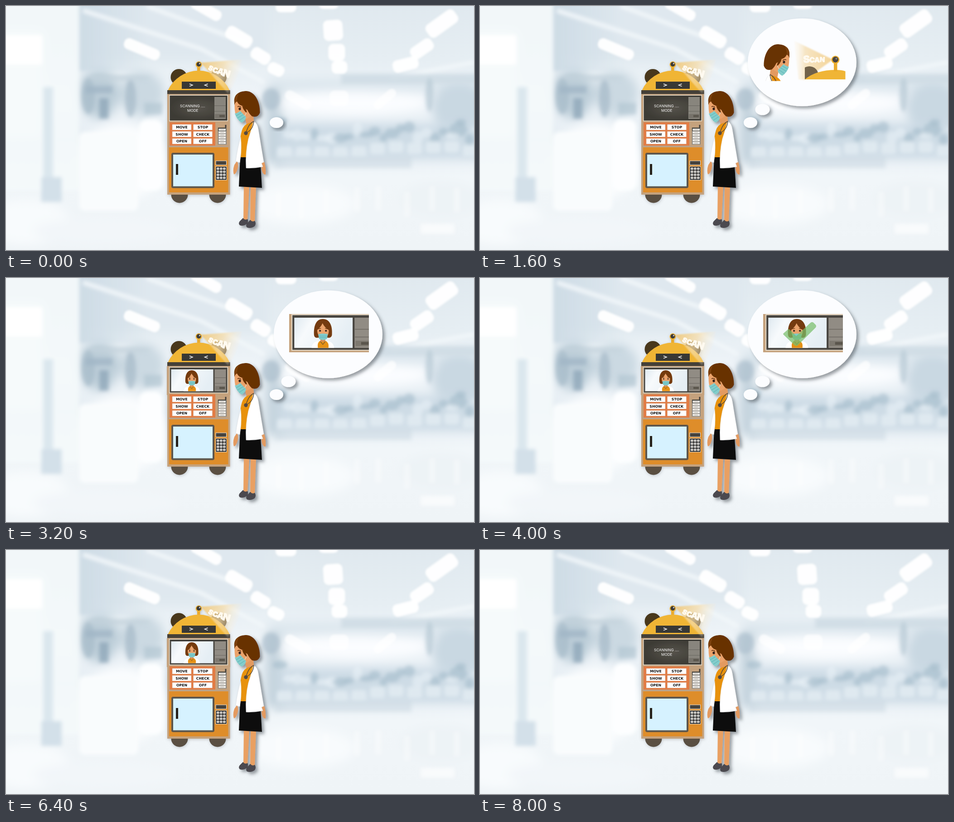
Recreate the animation shown at these times as an HTML page. Size 1033 px wide and 542 px high, loop 8800 ms.

```html
<!DOCTYPE html>
<html lang="en">
<head>
<meta charset="utf-8">
<title>Scanning robot</title>
<style>
html, body { margin: 0; width: 100%; height: 100%; overflow: hidden; background: #eef4f8; }
svg { display: block; width: 100vw; height: 100vh; }
.hide { display: none; }
.btn { font: 800 7.8px "DejaVu Sans", sans-serif; text-anchor: middle; fill: #111; }
.mode { font: 400 8.2px Inter, sans-serif; fill: #fff; }
.scan { font-weight: 900; font-family: Inter, "Open Sans", sans-serif; text-anchor: middle; fill: #fffaf0; stroke: #fffaf0; stroke-width: .8; stroke-linejoin: round; }
</style>
</head>
<body>
<svg viewBox="0 0 1033 542" preserveAspectRatio="none">
<defs>
  <filter id="soft" x="-20%" y="-20%" width="140%" height="140%"><feGaussianBlur stdDeviation="11"/></filter>
  <filter id="mid" x="-20%" y="-20%" width="140%" height="140%"><feGaussianBlur stdDeviation="4.5"/></filter>
  <filter id="lite" x="-20%" y="-20%" width="140%" height="140%"><feGaussianBlur stdDeviation="2.2"/></filter>
  <filter id="haze" x="-20%" y="-20%" width="140%" height="140%"><feGaussianBlur stdDeviation="1.6"/></filter>
  <filter id="drop" x="-20%" y="-20%" width="150%" height="150%"><feDropShadow dx="5" dy="5" stdDeviation="3.5" flood-color="#4a4f55" flood-opacity=".55"/></filter>
  <filter id="dim" x="-20%" y="-20%" width="150%" height="150%"><feDropShadow dx="1" dy="2" stdDeviation="3" flood-color="#5a6068" flood-opacity=".3"/></filter>
  <linearGradient id="room" x2="0" y2="1">
    <stop offset="0" stop-color="#e0e9ef"/><stop offset=".22" stop-color="#e6eef3"/>
    <stop offset=".38" stop-color="#f0f5f9"/><stop offset=".55" stop-color="#e5edf3"/>
    <stop offset=".7" stop-color="#f1f6f9"/><stop offset="1" stop-color="#eff4f7"/>
  </linearGradient>
  <linearGradient id="side" x2="1" y2="0">
    <stop offset="0" stop-color="#cddbe5"/><stop offset="1" stop-color="#cddbe5" stop-opacity="0"/>
  </linearGradient>
  <linearGradient id="ray" gradientUnits="userSpaceOnUse" x1="430" y1="128" x2="512" y2="158">
    <stop offset="0" stop-color="#f0c46e" stop-opacity=".85"/><stop offset=".55" stop-color="#f5dcaa" stop-opacity=".75"/>
    <stop offset="1" stop-color="#faf0dc" stop-opacity=".1"/>
  </linearGradient>
  <linearGradient id="ray2" gradientUnits="userSpaceOnUse" x1="780" y1="119" x2="692" y2="119">
    <stop offset="0" stop-color="#f3d190" stop-opacity=".95"/><stop offset=".7" stop-color="#f5e0b8" stop-opacity=".85"/>
    <stop offset="1" stop-color="#fbf3e3" stop-opacity=".15"/>
  </linearGradient>
  <linearGradient id="glass" x2="1" y2=".3">
    <stop offset="0" stop-color="#dfe9f0"/><stop offset=".3" stop-color="#f7fafc"/><stop offset="1" stop-color="#e5eef4"/>
  </linearGradient>
  <radialGradient id="dark"><stop offset="0" stop-color="#56534b"/><stop offset="1" stop-color="#3d3b35"/></radialGradient>
  <clipPath id="headBox"><rect x="630" y="80" width="60" height="86.5"/><rect x="622" y="80" width="10" height="66"/></clipPath>
  <clipPath id="shotBox"><rect x="625" y="80" width="176" height="85"/></clipPath>
  <clipPath id="earBox"><rect x="717" y="130" width="90" height="33"/></clipPath>

  <g id="shot">
    <rect x="355" y="196" width="140" height="64" fill="#c5a27d"/>
    <rect x="360" y="197.500" width="130" height="58.500" fill="#e9decb"/>
    <rect x="361.500" y="199" width="127" height="55.500" fill="#47443f"/>
    <rect x="364.500" y="203" width="93" height="48.500" fill="url(#glass)"/>
    <path d="M396 231C395 213 401 205 410 205S426 213 424.500 231Q423 236 418 235H402Q397 236 396 231Z" fill="#743b10"/>
    <path d="M406 234h8v8h-8z" fill="#d98f59"/>
    <path d="M401 223Q407 218 409.500 212Q413 219 419.500 223Q420 233 410.500 238Q401 233 401 223Z" fill="#eaa36c"/>
    <path d="M392 251.500Q393 242 403 240.500L410 246L417 240.500Q427 242 428 251.500Z" fill="#fff"/>
    <path d="M402 251.500Q401 243 405 240.500Q410 243 415 240.500Q420 243 419 251.500Z" fill="#e59116"/>
    <path d="M406 241L410 246L414 241" fill="none" stroke="#665035" stroke-width=".8"/>
    <path d="M402.500 229.500Q410 227.500 418 229.500L416.500 237Q410 240.500 404 237Z" fill="#7fcbcc"/>
    <path d="M404 232.500h13M404.500 235h12" stroke="#5aabb1" stroke-width=".6"/>
    <circle cx="405.500" cy="224" r="1.500" fill="#38251c"/><circle cx="415" cy="224" r="1.500" fill="#38251c"/>
    <path d="M403 221l4-1M413.500 220l4 1" stroke="#693510"/>
    <rect x="460.500" y="203" width="25" height="48.500" fill="#918c84"/>
    <path d="M461 221.500h24M461 234h24" stroke="#67635c" stroke-width=".9"/>
    <rect x="462" y="240" width="22" height="8.500" fill="#7d786f"/><rect x="471" y="242" width="12" height="4.500" fill="#5a554c"/>
  </g>

  <g id="woman">
    <path d="M525 400H537L533 477H524Z M540 400H552L549 480H539Z" fill="#e9a062"/>
    <path d="M523 471Q528 477 533 473Q536 479 532 484Q523 490 516 487Q512 483 516 478Z M539 475Q544 481 549 477Q553 483 549 489Q541 495 532 492Q528 488 532 483Z" fill="#4b4a50"/>
    <path d="M510 344Q514 352 511 362Q508 373 503 374Q500 365 504 353Z M563 350L570 346Q574 358 573 374Q568 376 565 366Z" fill="#e39a60"/>
    <path d="M517 333L561 338L565 404L514 401Z" fill="#111"/>
    <path d="M528 249L545 238L548 262L533 275Z" fill="#e39a60"/>
    <path d="M530 263Q540 258 548 257L545 302L533 336H518Q515 300 519 283Q522 268 530 263Z" fill="#e8920f"/>
    <path d="M518 291Q511 315 507 345L516 348Q520 325 519 304Z M546 256Q555 260 557 274Q563 312 569 347L564 349L567 357Q548 361 530 360Q528 325 535 295Q542 274 546 256Z" fill="#fff" stroke="#dbdcdd" stroke-width=".6"/>
    <path d="M547 256Q535 262 530 281M547 257Q545 275 531 281" fill="none" stroke="#5b4a39" stroke-width="1.500"/>
    <circle cx="529.500" cy="282.500" r="4.200" fill="#534a43"/>
    <path d="M506 207Q503 222 506 238L516 250Q530 255 541 244L542 212Z" fill="#eba26a"/>
    <path d="M504 214C502 197 514 189 531 189C549 190 561 212 560.500 237Q556 249 543 245Q537 240 533 231Q527 228 523 222Q513 220 510 212Q506 213 504 220Z" fill="#683303"/>
    <path d="M504 212Q505 198 514 193Q510 203 509 213Q506 213 504 218Z" fill="#7b400c"/>
    <path d="M521 221Q531 226 532 238Q524 233 521 221Z" fill="#683303"/>
    <path d="M511 224Q515 221 519 225" fill="none" stroke="#55290c" stroke-width="1.500"/>
    <ellipse cx="516" cy="228.500" rx="2.600" ry="3" fill="#35241e"/>
    <path d="M531 236L526 246" stroke="#e4f1ef"/>
    <path d="M505 239Q511 238 517 233L530 247Q528 255 520 259Q510 253 505 239Z" fill="#83cdcb"/>
    <path d="M508 244L520 237M511 249L524 241M515 254L527 246" stroke="#57aeb2" stroke-width="1"/>
  </g>
</defs>

<rect width="1033" height="542" fill="url(#room)"/>
<g id="far" filter="url(#soft)"></g>
<g id="near" filter="url(#mid)"></g>
<g id="lamps" filter="url(#lite)"></g>

<g id="robot" filter="url(#dim)">
  <circle cx="381.500" cy="158" r="18" fill="#49381f"/>
  <circle cx="469" cy="158" r="18" fill="#49381f"/>
  <circle cx="383" cy="419" r="18.500" fill="#5a5043"/><circle cx="467" cy="419" r="18.500" fill="#5a5043"/>
  <rect x="422" y="133" width="6.500" height="18" fill="#e9ab2d"/>
  <path d="M357 188A75 75 0 0 1 494 188Z" fill="#f0b536"/>
  <circle cx="425.500" cy="130" r="7" fill="#eeb02e"/><circle cx="425.500" cy="129.500" r="5" fill="#3c3a38"/><circle cx="427.500" cy="127.800" r="1.600" fill="#d6d2cc"/>
  <rect x="356" y="187" width="138.500" height="232" fill="#c5a27d"/>
  <rect x="356" y="187" width="138.500" height="8.500" fill="#454039"/>
  <rect x="388" y="168" width="75" height="16" fill="#393836"/>
  <g fill="none" stroke="#fff" stroke-width="1.400"><path d="M405 173l7 2.700l-7 2.700M445.500 173l-7 2.700l7 2.700"/></g>
  <g id="wait">
    <rect x="360" y="197.500" width="130" height="58.500" fill="#e9decb"/>
    <rect x="361.500" y="199" width="127" height="55.500" fill="url(#dark)"/>
    <rect x="460" y="202" width="25" height="49" fill="#88857d"/>
    <path d="M460 221.500h25M460 234h25" stroke="#69665f"/>
    <rect x="461" y="240" width="23" height="9" fill="#76726a"/><rect x="471" y="242" width="12" height="5" fill="#5c5850"/>
    <text class="mode" x="384" y="224.500">SCANNING ....</text>
    <text class="mode" x="400" y="235">MODE</text>
  </g>
  <use id="live" href="#shot"/>
  <rect x="361" y="258.500" width="101" height="51.500" fill="#e27b44"/>
  <g id="keys"></g>
  <path d="M483.500 264h3v8h-3z" fill="#45403a"/>
  <rect x="467.500" y="270" width="19.500" height="38" fill="#8e8a83"/>
  <rect x="468" y="270" width="18" height="8" fill="#4c4842"/>
  <g id="slots"></g>
  <path d="M358 311.500h134" stroke="#b7a28b" stroke-width="2"/>
  <rect x="360" y="314" width="130.500" height="100" fill="#de8d2a"/>
  <rect x="367" y="328" width="91" height="74.500" rx="2" fill="#d6f2ff" stroke="#5b564d" stroke-width="4"/>
  <rect x="375" y="351" width="5" height="24" fill="#28231e"/>
  <rect x="463" y="344" width="23.500" height="9" fill="#45423e" stroke="#e9e4da"/>
  <rect x="463" y="356.500" width="24" height="30" fill="#161616" stroke="#e9e4da"/>
  <g id="pad"></g>
</g>

<path d="M430 126L520 119Q515 160 490 194Z" fill="url(#ray)" filter="url(#haze)"/>
<g id="word"></g>

<use href="#woman" filter="url(#drop)"/>

<g fill="#fcfdff" filter="url(#drop)">
  <ellipse id="dot1" cx="597" cy="259" rx="15" ry="12"/>
  <ellipse id="dot2" cx="623.500" cy="230" rx="16" ry="12.300"/>
  <ellipse id="cloud" cx="711" cy="125" rx="120" ry="97.500"/>
</g>
<g id="scanView">
  <g clip-path="url(#headBox)"><use href="#woman" transform="matrix(-1 0 0 1 1187 -104)"/></g>
  <path d="M779 119L693 77L703 163L717 164Z" fill="url(#ray2)" filter="url(#haze)"/>
  <g clip-path="url(#earBox)">
    <circle cx="727" cy="154" r="20" fill="#5a4c36" opacity=".85"/>
    <path d="M717 163Q742 142 785 142Q800 142 806.500 145V163Z" fill="#f0b536"/>
  </g>
  <rect x="781" y="124" width="7.500" height="21" fill="#e9ab2d"/>
  <circle cx="784.500" cy="119.500" r="9" fill="#eeb02e"/><circle cx="784.500" cy="119" r="6.500" fill="#494540"/><circle cx="786.500" cy="117" r="2" fill="#8b8984"/>
</g>
<g id="shotView" clip-path="url(#shotBox)"><use href="#shot" transform="translate(131.500 -193) scale(1.385)"/></g>
<g id="tick" fill="#79bf6b" opacity=".72">
  <path d="M671 122L680 114Q682 113 684 115L698 129L730 99Q733 97 736 99L741 104Q743 107 741 110L702 149Q698 153 694 149L670 126Q668 124 671 122Z"/>
</g>
</svg>

<script>
const $ = id => document.getElementById(id);
const rect = (x, y, w, h, fill, extra = '') =>
  `<rect x="${x}" y="${y}" width="${w}" height="${h}" fill="${fill}" ${extra}/>`;
const blob = (x, y, rx, ry, fill, o = 1) =>
  `<ellipse cx="${x}" cy="${y}" rx="${rx}" ry="${ry}" fill="${fill}" opacity="${o}"/>`;
let seed = 7;
const rnd = () => (seed = seed * 16807 % 2147483647) / 2147483647;
const times = (n, fn) => Array.from({ length: n }, (_, i) => fn(i)).join('');

// Blurred hall
$('far').innerHTML =
  rect(160, -30, 420, 150, '#dfe8ef') +
  rect(-40, 55, 120, 240, '#fcfeff') +
  blob(205, 195, 45, 55, '#bccdd8') + blob(300, 195, 50, 50, '#cbd9e2') +
  rect(580, 160, 480, 30, '#dde7ee') + rect(575, 185, 32, 165, '#c2d2dc') +
  blob(765, 215, 165, 26, '#fbfdff') + blob(1000, 225, 60, 55, '#c9d8e2') +
  rect(600, 262, 450, 78, '#cedce6') +
  blob(255, 345, 95, 85, '#fbfdfe') + blob(45, 480, 95, 50, '#f8fbfd') +
  blob(650, 440, 120, 45, '#f8fbfd') + blob(220, 500, 160, 30, '#f2f6f9') + blob(960, 430, 90, 40, '#edf3f6');

$('near').innerHTML =
  rect(162, -20, 150, 165, 'url(#side)') +
  rect(-20, -20, 181, 430, '#f5f9fb', 'opacity=".85"') +
  rect(-20, 65, 100, 65, '#fff') + rect(82, 180, 22, 250, '#dbe7ee') + rect(78, 380, 45, 55, '#d3e0e9') +
  blob(182, 200, 14, 40, '#a9bdcb', .8) + rect(175, 178, 60, 16, '#9fb5c4', 'opacity=".75"') +
  rect(206, 205, 20, 45, '#8fa8b9', 'opacity=".8"') + blob(275, 205, 12, 42, '#a6bac8', .7) +
  blob(250, 160, 70, 7, '#c3d2dc', .7) + rect(305, 215, 40, 26, '#b3c6d2', 'opacity=".7"') +
  rect(294, 252, 52, 158, '#fdfeff', 'rx="18"') + rect(162, 280, 130, 175, '#f9fcfd', 'rx="12"') +
  '<path d="M170 10L430 95L570 170M310 0L540 85M1033 125L850 160" fill="none" stroke="#f1f6f9" stroke-width="9"/>' +
  rect(740, 151, 310, 22, '#cddbe4', 'opacity=".8"') +
  blob(585, 207, 20, 24, '#a9becb', .65) + blob(935, 197, 9, 38, '#b7c9d5', .7) + blob(998, 275, 20, 16, '#a9bfcd', .7) +
  times(24, i => blob(605 + i * 19, 255 + rnd() * 42, 8 + rnd() * 9, 6 + rnd() * 10, rnd() < .5 ? '#a3bbca' : '#eaf1f6', .6)) +
  times(11, i => rect(598 + i * 41, 300 + rnd() * 14, 34, 26, '#dfe9f0', 'rx="6"')) +
  rect(595, 334, 300, 26, '#c9d8e2', 'opacity=".5"') +
  times(9, i => rect(530 + i * 55 + rnd() * 20, 400 + rnd() * 20, 14, 55, '#fff', 'opacity=".35"')) +
  rect(915, 484, 75, 22, '#fff', 'opacity=".6"');

const lamps = [
  [300, 96, 84, 25, 23], [442, 8, 74, 25, 30], [514, 69, 63, 30, 31], [562, 111, 46, 28, 32],
  [596, 141, 38, 26, 25], [618, 2, 46, 24, 0], [712, 0, 42, 13, 0], [722, 54, 43, 46, -4],
  [730, 103, 37, 38, 0], [736, 136, 35, 29, 0], [962, 39, 76, 34, -36], [918, 95, 55, 29, -35], [882, 130, 58, 28, -14],
  [645, 209, 64, 22, 30], [735, 205, 42, 34, 0], [836, 207, 60, 20, -40]
];
$('lamps').innerHTML = lamps.map(([x, y, w, h, a], i) =>
  rect(x - w / 2, y - h / 2, w, h, '#fff', `rx="11" opacity="${i < 13 ? .95 : .7}" transform="rotate(${a} ${x} ${y})"`)).join('');

// Robot details
$('keys').innerHTML = ['MOVE', 'STOP', 'SHOW', 'CHECK', 'OPEN', 'OFF'].map((t, i) => {
  const x = 367 + i % 2 * 46.5, y = 263 + (i >> 1) * 15.6;
  return rect(x, y, 42, 12.4, '#fff', 'stroke="#c9a184" stroke-width=".5"') +
    `<text class="btn" x="${x + 21}" y="${y + 9.1}">${t}</text>`;
}).join('');
$('slots').innerHTML = times(6, i =>
  rect(469.5, 272.5 + i * 5.9, 15.5, 4.4, '#f0eeea') + rect(473, 274.4 + i * 5.9, 8, .7, '#99948c'));
$('pad').innerHTML = times(12, i => {
  const x = 465.2 + i % 3 * 7, y = 358.8 + Math.floor(i / 3) * 6.8;
  return rect(x, y, 5.4, 5, '#f5f3ef') + rect(x + 1.9, y + 1.5, 1.6, 2, '#555');
});

const letters = list => list.map(([c, x, y, size, a]) =>
  `<text class="scan" font-size="${size}" transform="translate(${x} ${y}) rotate(${a})" y="${size * .36}">${c}</text>`).join('');
$('word').innerHTML = letters([['S', 452, 138, 15, 28], ['C', 462, 142.5, 16, 12], ['A', 473.5, 145.5, 19, 18], ['N', 487, 150, 22, 17]]);
$('scanView').insertAdjacentHTML('beforeend',
  letters([['S', 720.5, 118, 22, -4], ['C', 733, 119.5, 16, 3], ['A', 744, 119.5, 15, 0], ['N', 755.5, 119, 15, 3]]));

// Each step: small bubbles, thought content, portrait on the screen
const stepMs = 800;
const steps = [
  [1, '', 0], [2, '', 0], [2, 'scan', 0], [2, 'scan', 1], [2, 'shot', 1], [2, 'tick', 1],
  [2, '', 1], [1, '', 1], [0, '', 1], [0, '', 0], [0, '', 0]
];
const show = (id, on) => $(id).classList.toggle('hide', !on);
let last = -1;
function draw() {
  const n = Math.floor(performance.now() / stepMs) % steps.length;
  if (n !== last) {
    const [dots, view, live] = steps[last = n];
    show('dot1', dots > 0);
    show('dot2', dots > 1);
    show('cloud', view);
    show('scanView', view === 'scan');
    show('shotView', view === 'shot' || view === 'tick');
    show('tick', view === 'tick');
    show('live', live);
    show('wait', !live);
  }
  requestAnimationFrame(draw);
}
draw();
</script>
</body>
</html>
```
